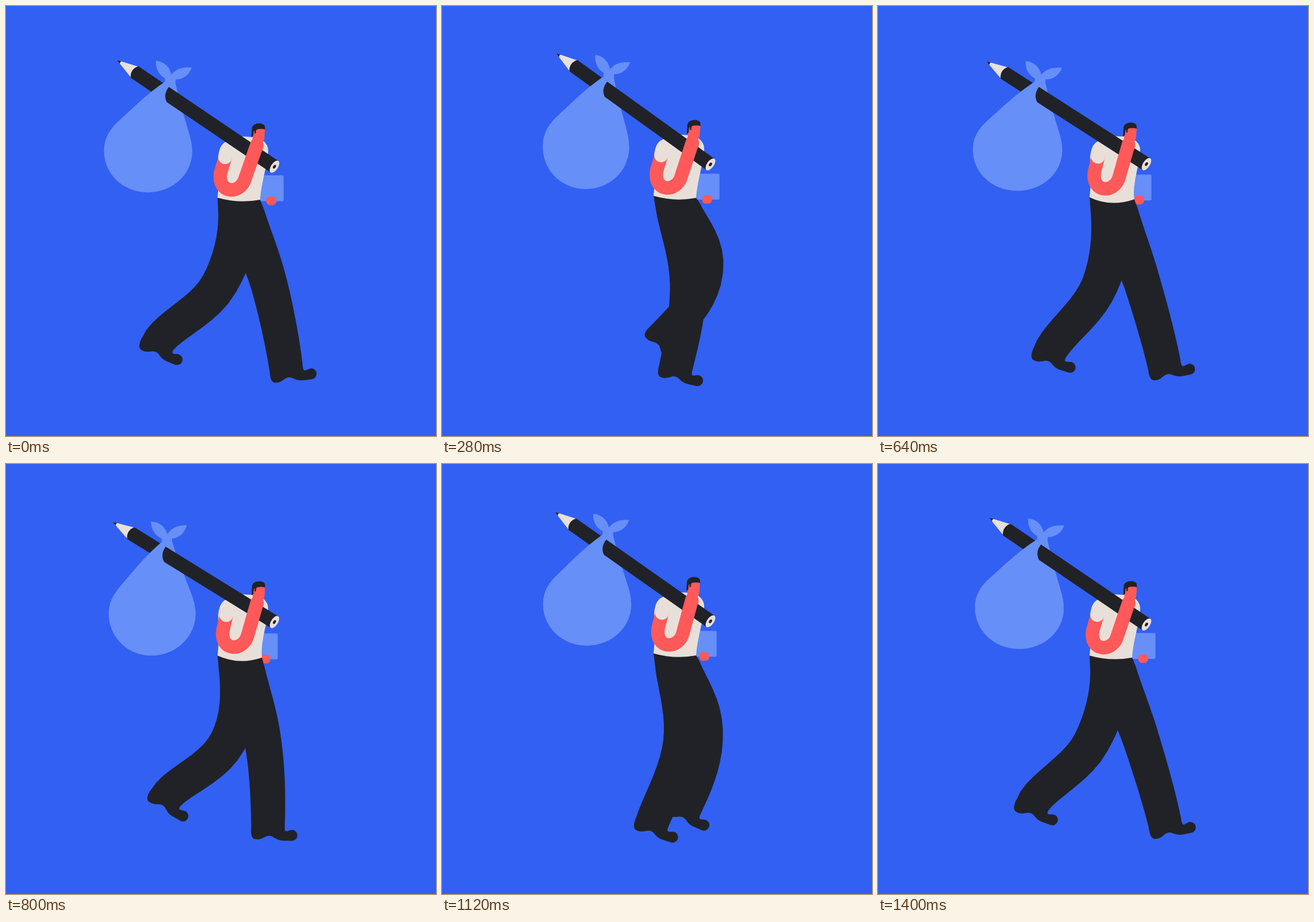
Recreate the animation shown at these times as an HTML page with a canvas. Size 748 by 748 pixels, loop 1.44 s.

```html
<!DOCTYPE html>
<html lang="en">
<head>
<meta charset="utf-8">
<title>Walker</title>
<style>
  html, body { margin: 0; height: 100%; overflow: hidden; background: #3260f2; }
  canvas { display: block; }
</style>
</head>
<body>
<canvas id="stage" width="748" height="748"></canvas>
<script>
const ctx = document.getElementById('stage').getContext('2d');
const LOOP = 1440, STEP = 40, LEG_LAG = 750;
const BLUE = '#3260f2', SKY = '#668ff8', INK = '#212227', RED = '#ff595a', SAND = '#e8e0d8';

// One stride, shared by both legs: time, ankle x, ankle y, foot angle, knee bend
const stride = [
  [0, 488, 636, -7, 11],
  [275, 407, 634, 12, 23],
  [440, 361, 627, 18, 33],
  [640, 297, 607, 18, 37],
  [750, 262, 591, 22, 43],
  [960, 351, 568, 53, 72],
  [1190, 447, 619, 8, 30],
  [1395, 500, 631, -11, 6]
];

function hermite(p, q, a, b, u) {
  return p + u * (a + u * (3 * (q - p) - 2 * a - b + u * (2 * (p - q) + a + b)));
}

// Smooth periodic interpolation through the stride
function strideAt(t) {
  const n = stride.length;
  const key = k => stride[(k + n) % n];
  const time = k => key(k)[0] + LOOP * Math.floor(k / n);
  let i = n - 1;
  while (stride[i][0] > t) i--;
  const span = time(i + 1) - time(i);
  const slope = (k, c) => (key(k + 1)[c] - key(k - 1)[c]) / (time(k + 1) - time(k - 1)) * span;
  return key(i).map((p, c) =>
    hermite(p, key(i + 1)[c], slope(i, c), slope(i + 1, c), (t - time(i)) / span));
}

const swing = (t, peak, beats = 1) => Math.cos(2 * Math.PI * beats * (t - peak) / LOOP);

function shape(color, d) {
  ctx.fillStyle = color;
  ctx.fill(new Path2D(d));
}

function disc(color, x, y, rx, ry = rx) {
  ctx.fillStyle = color;
  ctx.beginPath();
  ctx.ellipse(x, y, rx, ry, 0, 0, 2 * Math.PI);
  ctx.fill();
}

function at(x, y, angle, draw) {
  ctx.save();
  ctx.translate(x, y);
  ctx.rotate(angle);
  draw();
  ctx.restore();
}

// A tapered tube around a curve from hip over knee to ankle, plus the shoe
function leg(t, hipLeft, hipRight, dy) {
  const [, ax, ay, degrees, bend] = strideAt(t % LOOP);
  const foot = degrees * Math.PI / 180;
  const hx = (hipLeft + hipRight) / 2, hy = 335 + dy;
  const reach = Math.hypot(ax - hx, ay - hy);
  const dirX = (ax - hx) / reach, dirY = (ay - hy) / reach;
  const kx = (hx + ax) / 2 + bend * dirY, ky = (hy + ay) / 2 - bend * dirX;
  const hip = [hx, hy, 0.8 * Math.max(12, kx - hx), 150];
  const knee = [kx, ky, 170 * dirX, 170 * dirY];
  const ankle = [ax, ay, -110 * Math.sin(foot), 110 * Math.cos(foot)];

  const back = [[hipLeft, 333 + dy]], front = [[hipRight, 337 + dy]];
  const sides = (a, b, u, width) => {
    const point = v => [0, 1].map(c => hermite(a[c], b[c], a[c + 2], b[c + 2], v));
    const [x, y] = point(u), [x0, y0] = point(u - 0.01), [x1, y1] = point(u + 0.01);
    const scale = width / Math.hypot(x1 - x0, y1 - y0);
    const nx = (y1 - y0) * scale, ny = (x0 - x1) * scale;
    back.push([x - nx, y - ny]);
    front.push([x + nx, y + ny]);
  };
  const hipWidth = (hipRight - hipLeft) / 2;
  for (let u = 0.2; u < 0.95; u += 0.1) sides(hip, knee, u, hipWidth + (32 - hipWidth) * u);
  for (let i = 0; i <= 10; i++) sides(knee, ankle, i / 10, 32 - 0.3 * i);

  ctx.fillStyle = INK;
  ctx.beginPath();
  for (const p of [...back, ...front.reverse()]) ctx.lineTo(...p);
  ctx.fill();
  at(ax, ay, foot, () => shape(INK, 'M-29-3C-30 9-28 17-20 17C-9 18-5 10 3 10.5' +
    'C11 11 13 18.5 28 18.5L42 18.5A9.5 9.5 0 0 0 42-.5C35 0 30 6 29-3Z'));
}

function book(t) {
  const right = 478.8 + 5.3 * swing(t, 120) + swing(t, 480, 2);
  const top = 292.5 + 2.3 * swing(t, 60, 2);
  const box = (color, x, y, w, h, r) => {
    ctx.fillStyle = color;
    ctx.beginPath();
    ctx.roundRect(x, y, w, h, r);
    ctx.fill();
  };
  box(SKY, 435, top, right - 435, 45, 2);
  box(RED, right - 30, top + 37, 17, 15, 6);
}

function bag(t) {
  const tilt = 0.1 + 3 * swing(t, 240) + 3.2 * swing(t, 510, 2);
  const stretch = 1 + 0.022 * swing(t, 200, 2);
  ctx.rotate(tilt * Math.PI / 180);
  ctx.scale(1 / stretch, stretch);
  shape(SKY, 'M-7 4C-33 22-50 38-86 73C-105 90-113 107-113 126C-113 167-80 199-37 199' +
    'C6 199 40 167 40 127C40 100 27 82 9 6Z');
  shape(SKY, 'M2-7C-2-24-14-30-25-31C-26-14-16-3-7 0Z');
  shape(SKY, 'M1-6C10-18 22-21 37-20C32-4 18 2 7 1Z');
  shape(SKY, 'M-9-1C-7-8 7-9 10-4C10 0 9 6 9 8L-9 8Z');
}

function pencilAndBag(t) {
  const y = 275.6 + 2.2 * swing(t, 60) + 1.8 * swing(t, 10, 2);
  const angle = (34.2 + 1.25 * swing(t, 110) + 1.3 * swing(t, 400, 2)) * Math.PI / 180;
  at(467, y, angle, () => {
    shape(SAND, 'M-331 0L-292-12L-292 12Z');
    shape(INK, 'M-331 0L-323-2.6Q-325 0-323 2.6Z');
    shape(INK, 'M-294-12Q-303 0-294 12L-210 12L-210-12Z');
    at(-236, -25, -angle, () => bag(t));
    shape(INK, 'M-230-12Q-231 5-218 12L0 12L0-12Z');
    disc(SAND, 0, 0, 6, 12);
    disc(INK, 0, 0, 2.3, 3.6);
  });
}

function head() {
  shape(RED, 'M429 212L451 212L449.5 232Q448 240 440 242L426 240Q430 234 429 224Z');
  shape(INK, 'M427 228L428 213C429 203 447 202 450.5 209L451 215Q444 213 436.5 215' +
    'Q435 216 434.7 222L432.6 222L432.6 217Q431 216 430.5 225Q430 228 427 228Z');
}

function arm(t, dy) {
  const ex = 2.2 - 2.3 * swing(t, 130);
  const ey = -2.6 + 2.2 * swing(t, 30, 2) + 0.7 * swing(t, 110);
  const sx = 381 + ex / 2, hx = 435.5 + swing(t, 80, 2), hy = 242 + dy * 1.3;
  ctx.strokeStyle = RED;
  ctx.lineWidth = 23.5;
  ctx.lineCap = 'round';
  ctx.beginPath();
  ctx.moveTo(sx, 264 + dy);
  ctx.lineTo(373 + ex, 290 + ey);
  ctx.bezierCurveTo(367 + ex, 327 + ey, 408 + ex, 329 + ey, 416 + ex, 299 + ey);
  ctx.lineTo(hx, hy);
  ctx.stroke();
  disc(RED, hx + 3.5, hy + 3, 8);
  disc(SAND, sx, 263 + dy, 12);
}

function torso(waist) {
  shape(SAND, `M368 333.5Q405 ${344 + 2 * (waist - 442)} ${waist} 337C443 318 449 295 452 280` +
    'C456 262 457 250 455 245C452 236 443 229 430 228L412 227C398 230 388 233 383 236' +
    'C373 240 370 252 369 264L371 300Z');
}

function draw(t) {
  const bob = swing(t, 30, 2) - 1, dy = 2 * bob;
  const waist = 442 + 4 * Math.max(0, swing(t, 700)) ** 2;
  ctx.fillStyle = BLUE;
  ctx.fillRect(0, 0, 748, 748);
  book(t);
  leg(t + LEG_LAG, 368, waist, dy);
  leg(t, 368, waist, dy);
  at(0, dy, 0, () => torso(waist));
  pencilAndBag(t);
  at(swing(t, 80, 2) - 1, 4 * bob, 0, head);
  arm(t, dy);
}

function tick() {
  draw(Math.floor(performance.now() % LOOP / STEP) * STEP);
  requestAnimationFrame(tick);
}
tick();
</script>
</body>
</html>
```
